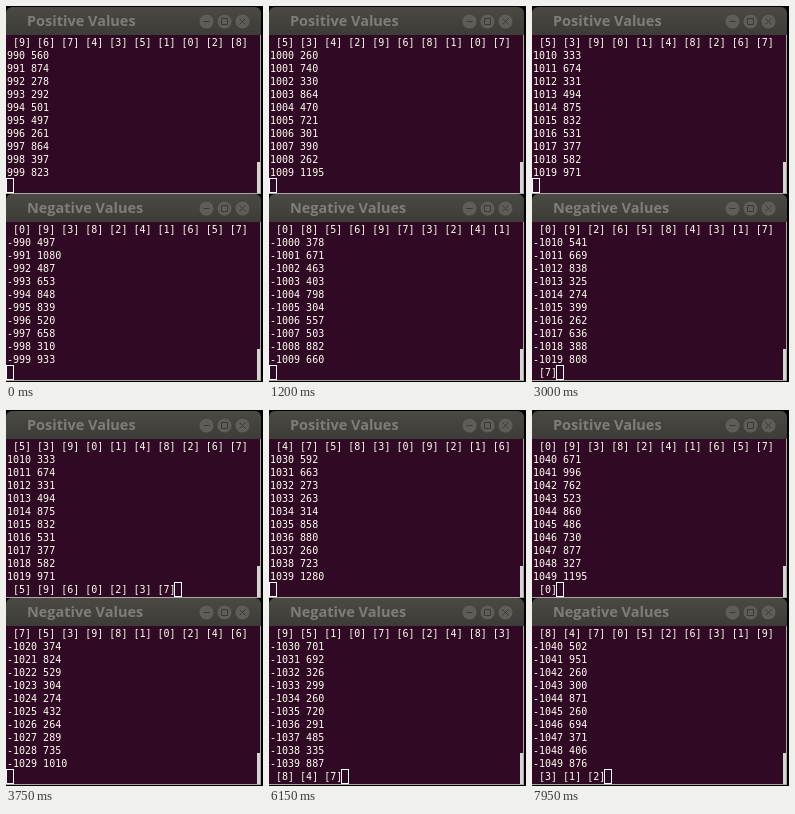
Recreate the animation shown at these times as an HTML page. Size 257 by 376 pixels, loop 8000 ms.

```html
<!DOCTYPE html>
<html lang="en">
<head>
<meta charset="utf-8">
<style>
html, body { margin: 0; width: 100%; height: 100%; overflow: hidden; background: #000; }
.window { position: absolute; left: 0; width: 255px; height: 187px; }
.bar { height: 28px; border-radius: 6px 6px 0 0; background: linear-gradient(#4a4943, #3d3c38); }
.title { position: absolute; left: 21px; top: 4px; font: bold 14.5px/20px "Open Sans", sans-serif; color: #807d78; }
.bar svg { position: absolute; left: 192px; top: 6px; }
.screen { position: absolute; top: 28px; width: 254px; height: 158px; background: #300a24; border: solid #aaa6a2; border-width: 0 1px 1px 0; }
pre { position: absolute; left: 1px; top: 1px; margin: 0; font: 10px/13px "DejaVu Sans Mono", monospace; color: #fffdf0; }
.cursor { position: absolute; top: 143px; width: 6px; height: 13px; border: 1px solid #fff; }
.thumb { position: absolute; left: 251px; top: 127px; width: 3px; height: 31px; background: #d8d5d0; }
</style>
</head>
<body>
<script>
const LOOP = 8000, STEP = 150;

// Spans in which neither terminal prints.
const pauses = [[4500, 4950], [5850, 6150], [7350, 7950]];

// Each batch types its order from its first time to its second.
const terminals = [
  { title: 'Positive Values', sign: '', top: 1, seed: 3,
    batches: [[300, 1200], [1500, 2550], [3000, 3900], [4650, 5400], [6150, 6900], [7800, 8700]] },
  { title: 'Negative Values', sign: '-', top: 188, seed: 8,
    batches: [[300, 1200], [1500, 2550], [2850, 3750], [4350, 5400], [5700, 6750], [7050, 9300]] }
];

function random(a, b) {
  const x = Math.sin(a * 127.1 + b * 311.7) * 43758.5453;
  return x - Math.floor(x);
}

const shuffled = seed => [...'0123456789'].sort((a, b) => random(seed, a) - random(seed, b));
const brackets = digits => digits.map(d => ` [${d}]`).join('');

// Mostly short timings, with slower second and last entries.
function result(seed, n) {
  const slow = n % 10 === 1 || n % 10 === 9 ? 400 : 0;
  return Math.floor(260 + slow + 650 * random(seed, n) ** 2);
}

const button = (x, mark) => `<g transform="translate(${x} 8.5)">
  <circle r="7.5" fill="#5f5d57" stroke="#3b3a36" stroke-width=".6"/>
  <path d="${mark}" fill="none" stroke="#3a3934"/></g>`;

const buttons = `<svg width="54" height="17">${
  button(8.5, 'M-3 0h6') + button(26.5, 'M-3-3h6v6h-6z') + button(44.5, 'M-3-3l6 6M3-3l-6 6')
}</svg>`;

for (const term of terminals) {
  const el = document.createElement('div');
  el.className = 'window';
  el.style.top = term.top + 'px';
  el.innerHTML = `<div class="bar"><span class="title">${term.title}</span>${buttons}</div>
    <div class="screen"><pre></pre><div class="cursor"></div><div class="thumb"></div></div>`;
  document.body.append(el);
  term.text = el.querySelector('pre');
  term.cursor = el.querySelector('.cursor');
}

function clock(time) {
  const pause = pauses.find(([from, to]) => time >= from && time < to);
  return pause ? pause[0] : Math.floor(time / STEP) * STEP;
}

function draw(time) {
  const now = clock(time);
  for (const { batches, seed, sign, text, cursor } of terminals) {
    const batch = batches.findIndex(([, end]) => now < end);
    const [start, end] = batches[batch];
    const count = Math.max(0, Math.floor(9 * (now - start) / (end - start)));
    const typed = brackets(shuffled(seed + batch + 1).slice(0, count));
    const lines = Array.from({ length: 10 }, (_, i) => {
      const n = 990 + batch * 10 + i;
      return `${sign}${n} ${result(seed, n)}`;
    });
    const content = [brackets(shuffled(seed + batch)), ...lines, typed].join('\n');
    if (text.textContent !== content) text.textContent = content;
    cursor.style.left = typed.length * 6 + 'px';
  }
}

const origin = performance.now();
function tick() {
  draw((performance.now() - origin) % LOOP);
  requestAnimationFrame(tick);
}
tick();
</script>
</body>
</html>
```
